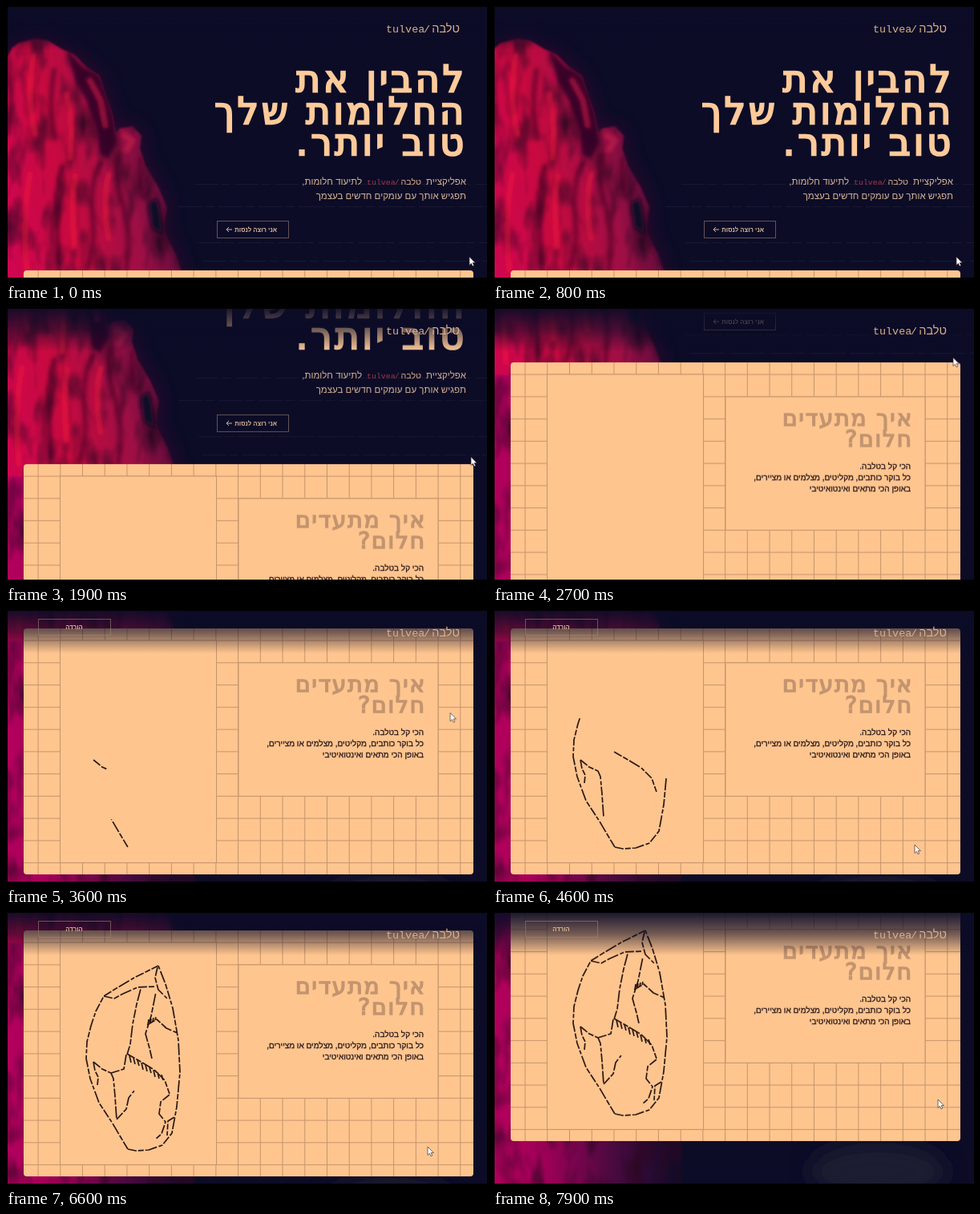
These frames come from a looping animation (600x342 px, 8 s). An HTML page:

```html
<!DOCTYPE html>
<html lang="he">
<head>
<meta charset="utf-8">
<title>יומן חלומות</title>
<style>
@property --t { syntax: "<number>"; inherits: true; initial-value: 0; }
:root { animation: clock 8s linear infinite; }
@keyframes clock { from { --t: 0; } to { --t: 8000; } }

html, body { margin: 0; width: 100%; height: 100%; overflow: hidden; background: #000; }
#stage { position: relative; width: 600px; height: 342px; overflow: hidden; background: #0c0c27; }
#page, #stage svg { position: absolute; left: 0; top: 0; }
#page { width: 600px; height: 720px; will-change: transform; animation: scroll 8s linear infinite; }
#rock { will-change: transform; animation: sway 8s linear infinite; }
#frame { position: absolute; inset: 0; border: solid #000; border-width: 1px 0 3px 2px; }

@keyframes scroll {
  0%, 12.5% { transform: translateY(0); }
  17.5% { transform: translateY(-61px); }
  23.75% { transform: translateY(-135px); }
  33.75% { transform: translateY(-262px); }
  38%, 94% { transform: translateY(-307px); }
  98.75% { transform: translateY(-351px); }
  100% { transform: translateY(-362px); }
}
@keyframes sway {
  0% { transform: translateX(0); }
  17.5%, 100% { transform: translateX(-10px); }
}
@keyframes point {
  0%, 12.5% { transform: translate(578px, 313px); }
  17.5% { transform: translate(583px, 258px); }
  23.75% { transform: translate(580px, 186px); }
  33.75% { transform: translate(574px, 62px); }
  38%, 41% { transform: translate(573px, 18px); }
  51%, 93% { transform: translate(526px, 293px); }
  98.75% { transform: translate(555px, 234px); }
  100% { transform: translate(556px, 228px); }
}
@keyframes appear {
  0%, 35% { opacity: 0; }
  40%, 100% { opacity: 1; }
}

text { font-family: "Liberation Sans", sans-serif; direction: rtl; }
.big { font-family: "DejaVu Sans", sans-serif; stroke-width: .055em; }
.hero { font-size: 46px; letter-spacing: 4px; fill: #fdca9a; stroke: #fdca9a; }
.title { font-size: 28px; letter-spacing: 1.9px; fill: #c3946f; stroke: #c3946f; }
.lead { font-size: 11.5px; fill: #d8b697; }
.body { font-size: 10px; fill: #2c1a1c; stroke: #2c1a1c; stroke-width: .3px; }
.button { font-size: 7.7px; font-weight: 700; fill: #dcb897; }
.latin { font-family: "Liberation Mono", monospace; font-size: 13.4px; direction: ltr; }
.logo { fill: #d9b08b; }
.logo text:not(.latin) { font-size: 14.5px; }
.box { fill: none; stroke: #a08474; stroke-opacity: .6; }
.ink { fill: none; stroke: #2a1710; stroke-width: 1.7; stroke-dasharray: 11 2 7 2 15 2.5 5 2; stroke-linejoin: round; }
.reveal {
  fill: none; stroke: #fff; stroke-width: 6; stroke-dasharray: 1px 2px;
  stroke-dashoffset: calc(1px * clamp(0, 1 - (var(--t) - var(--a)) / var(--d), 1));
}
#cursor { animation: point 8s linear infinite; }
#download { animation: appear 8s linear infinite; }
</style>
</head>
<body>
<div id="stage">
  <div id="page">
    <svg id="rock" width="300" height="720" style="overflow:visible">
      <defs>
        <linearGradient id="red" gradientUnits="userSpaceOnUse" x1="0" y1="290" x2="228" y2="240">
          <stop stop-color="#cf0650"/><stop offset=".35" stop-color="#c80a40"/>
          <stop offset=".7" stop-color="#9c0f45"/><stop offset="1" stop-color="#3a0a34"/>
        </linearGradient>
        <linearGradient id="low">
          <stop stop-color="#c20060"/><stop offset=".4" stop-color="#a00058"/>
          <stop offset=".7" stop-color="#4a0a40"/><stop offset="1" stop-color="#0c0c27"/>
        </linearGradient>
        <filter id="stone" filterUnits="userSpaceOnUse" x="-40" y="30" width="320" height="690" color-interpolation-filters="sRGB">
          <feTurbulence type="fractalNoise" baseFrequency=".04 .016" numOctaves="3" seed="8"/>
          <feColorMatrix values="0 0 0 0 .18  0 0 0 0 .03  0 0 0 0 .14  2.2 0 0 0 -.95"/>
          <feComposite in2="SourceAlpha" operator="in" result="dark"/>
          <feMerge result="all"><feMergeNode in="SourceGraphic"/><feMergeNode in="dark"/></feMerge>
          <feGaussianBlur in="all" stdDeviation=".9"/>
        </filter>
        <filter id="soft" x="-50%" y="-50%" width="200%" height="200%"><feGaussianBlur stdDeviation="2.5"/></filter>
        <filter id="glow" x="-50%" y="-50%" width="200%" height="200%"><feGaussianBlur stdDeviation="12"/></filter>
        <path id="peak" d="M-40 66H0L8 52 16 46 36 41 52 43 70 54 84 60 100 76 116 87 123 109 132 135 136 160 142 153 158 150 169 162 167 178 174 199 190 226 201 252 196 279 212 311 224 346H-40Z"/>
        <clipPath id="inside"><use href="#peak"/></clipPath>
      </defs>
      <use href="#peak" fill="#5a0a38" opacity=".6" filter="url(#glow)"/>
      <g filter="url(#stone)">
        <rect x="-40" y="335" width="285" height="385" fill="url(#low)"/>
        <use href="#peak" fill="url(#red)"/>
      </g>
      <g clip-path="url(#inside)">
        <g filter="url(#soft)" fill="none" stroke-linecap="round" stroke-linejoin="round">
          <path fill="#2a0824" fill-opacity=".85" d="M76 56L98 78 118 88 134 135 138 170 128 192 117 184 112 150 100 118 86 92Z"/>
          <path stroke="#b01444" stroke-width="4" d="M104 92L118 118 124 150"/>
          <path stroke="#4a0826" stroke-width="6" stroke-opacity=".6" d="M-2 70Q12 110 2 160M60 80Q52 130 62 165M118 196Q104 220 108 262T100 330M140 186Q136 220 146 250T150 330M70 200Q60 240 66 320M168 190Q164 215 172 240"/>
          <path stroke="#f0143c" stroke-width="7" stroke-opacity=".55" d="M34 62Q26 110 36 160M76 110Q84 150 80 190M86 212Q80 250 86 300M128 210Q120 240 128 290M30 210Q20 260 26 330"/>
          <path stroke="#c01a48" stroke-width="8" stroke-opacity=".7" d="M148 162L158 168 150 180"/>
          <path fill="#0b1028" d="M178 246L188 240 193 262 194 284 182 276Z"/>
        </g>
      </g>
    </svg>

    <svg width="600" height="720">
      <defs>
        <pattern id="grid" patternUnits="userSpaceOnUse" x="39.6" y="344.6" width="27.72" height="27.75">
          <path d="M0 .5H28M.5 0V28" stroke="#c6936a" fill="none"/>
        </pattern>
        <clipPath id="round"><rect x="22" y="330" width="561" height="307" rx="4"/></clipPath>
      </defs>
      <path d="M235 222.500H600M215 250.500H600M240 295.500H600M245 318.500H600" stroke="#8f8aa8" stroke-opacity=".1" stroke-dasharray="30 3 12 5"/>
      <ellipse cx="480" cy="675" rx="85" ry="36" fill="#1b1a30" filter="url(#glow)"/>

      <text class="big hero" x="575" y="107">להבין את</text>
      <text class="big hero" x="575" y="146.500">החלומות שלך</text>
      <text class="big hero" x="575" y="186">טוב יותר.</text>

      <text class="lead" x="574" y="223">אפליקציית</text>
      <g class="logo" transform="translate(450 223) scale(.74)">
        <text class="latin" fill="#a03a4c">tulvea</text>
        <text class="latin" x="47" fill="#a03a4c">/</text>
        <text x="92">טלבה</text>
      </g>
      <text class="lead" x="444" y="223">לתיעוד חלומות,</text>
      <text class="lead" x="574" y="241">תפגיש אותך עם עומקים חדשים בעצמך</text>

      <rect class="box" x="263.500" y="268.500" width="89" height="21"/>
      <text class="button" x="338" y="281.500">אני רוצה לנסות</text>
      <path d="M282 279H275M278 276L275 279 278 282" fill="none" stroke="#dcb897"/>

      <g clip-path="url(#round)">
        <rect x="22" y="330" width="561" height="307" fill="#fec58f"/>
        <rect x="22" y="330" width="561" height="307" fill="url(#grid)"/>
        <g fill="#fec58f" stroke="#c6936a">
          <rect x="67.500" y="345" width="195" height="277.500"/>
          <rect x="290" y="372.900" width="249" height="166.500"/>
        </g>
      </g>
      <text class="big title" x="524" y="409">איך מתעדים</text>
      <text class="big title" x="524" y="435">חלום?</text>
      <text class="body" x="521" y="462.500">הכי קל בטלבה.</text>
      <text class="body" x="521" y="476.500">כל בוקר כותבים, מקליטים, מצלמים או מציירים,</text>
      <text class="body" x="521" y="490.500">באופן הכי מתאים ואינטואיטיבי</text>

      <g id="sketch" transform="translate(0 307)"></g>
    </svg>
  </div>

  <svg width="600" height="342">
    <defs>
      <linearGradient id="fade" x2="0" y2="1">
        <stop stop-color="#0c0c27" stop-opacity=".95"/>
        <stop offset=".5" stop-color="#0c0c27" stop-opacity=".58"/>
        <stop offset="1" stop-color="#0c0c27" stop-opacity="0"/>
      </linearGradient>
    </defs>
    <rect width="600" height="54" fill="url(#fade)"/>
    <g class="logo" transform="translate(474 33)">
      <text class="latin">tulvea</text>
      <text class="latin" x="47">/</text>
      <text x="92">טלבה</text>
    </g>
    <g id="download">
      <rect class="box" x="40.500" y="11.500" width="90" height="20"/>
      <text class="button" x="85" y="24" text-anchor="middle">הורדה</text>
    </g>
    <path id="cursor" d="M0 0V10.500L2.400 8.300 4 11.800 5.700 11 4.200 7.600H7.300Z" fill="#fff" stroke="#3a2a2a" stroke-width=".7"/>
  </svg>
  <div id="frame"></div>
</div>

<script>
// Each stroke: start time, drawing time, path
const strokes = [
  [3300, 1550, "M152 296L143 281 133 264 116 238 105 208 100 183 101 162 106 142 112 124 122 105"],
  [3700, 1900, "M152 296L162 298 178 297 195 291 207 276 213 243 217 200 215 160 208 120 199 90 190 67"],
  [3400, 800, "M109 187L120 196 131 201 134 208 136 230 138 259"],
  [3900, 400, "M109 187L111 198 115 206 114 216"],
  [4000, 600, "M151 177L165 185 185 197 198 210 204 227"],
  [4650, 500, "M138 259L150 246 153 232 160 223"],
  [4700, 500, "M131 201L147 196 150 178"],
  [4800, 600, "M151 178L155 165 158 140 163 115 168 96"],
  [5000, 500, "M204 228L193 237 191 252 199 262 194 277 187 283"],
  [5200, 400, "M210 256L202 261 201 279"],
  [5100, 600, "M182 183L179 170 174 152 181 130 187 100"],
  [5500, 400, "M176 141L188 134 200 145 214 151"],
  [5500, 600, "M122 105L138 95 160 82 190 67"],
  [5700, 500, "M122 105L135 108 146 102 164 94 186 93"],
  [5900, 400, "M189 69L186 82 190 97 201 108"]
];

// Hatching below the ridge and beside the notch
for (let i = 0; i < 9; i++) {
  const x = 154 + i * 5, y = 179 + i * 3;
  strokes.push([4900 + i * 60, 150, `M${x} ${y}L${x + 2} ${y + 9 - i % 3}`]);
}
for (let i = 0; i < 4; i++) {
  strokes.push([5900 + i * 60, 150, `M${177 + i * 3} ${141 - i * 2}l1 -${7 - i}`]);
}

document.getElementById("sketch").innerHTML = strokes.map(([start, time, d], i) => `
  <mask id="m${i}" maskUnits="userSpaceOnUse" x="60" y="40" width="210" height="280">
    <path class="reveal" pathLength="1" d="${d}" style="--a:${start};--d:${time}"/>
  </mask>
  <g mask="url(#m${i})"><path class="ink" d="${d}"/></g>`).join("");
</script>
</body>
</html>
```
